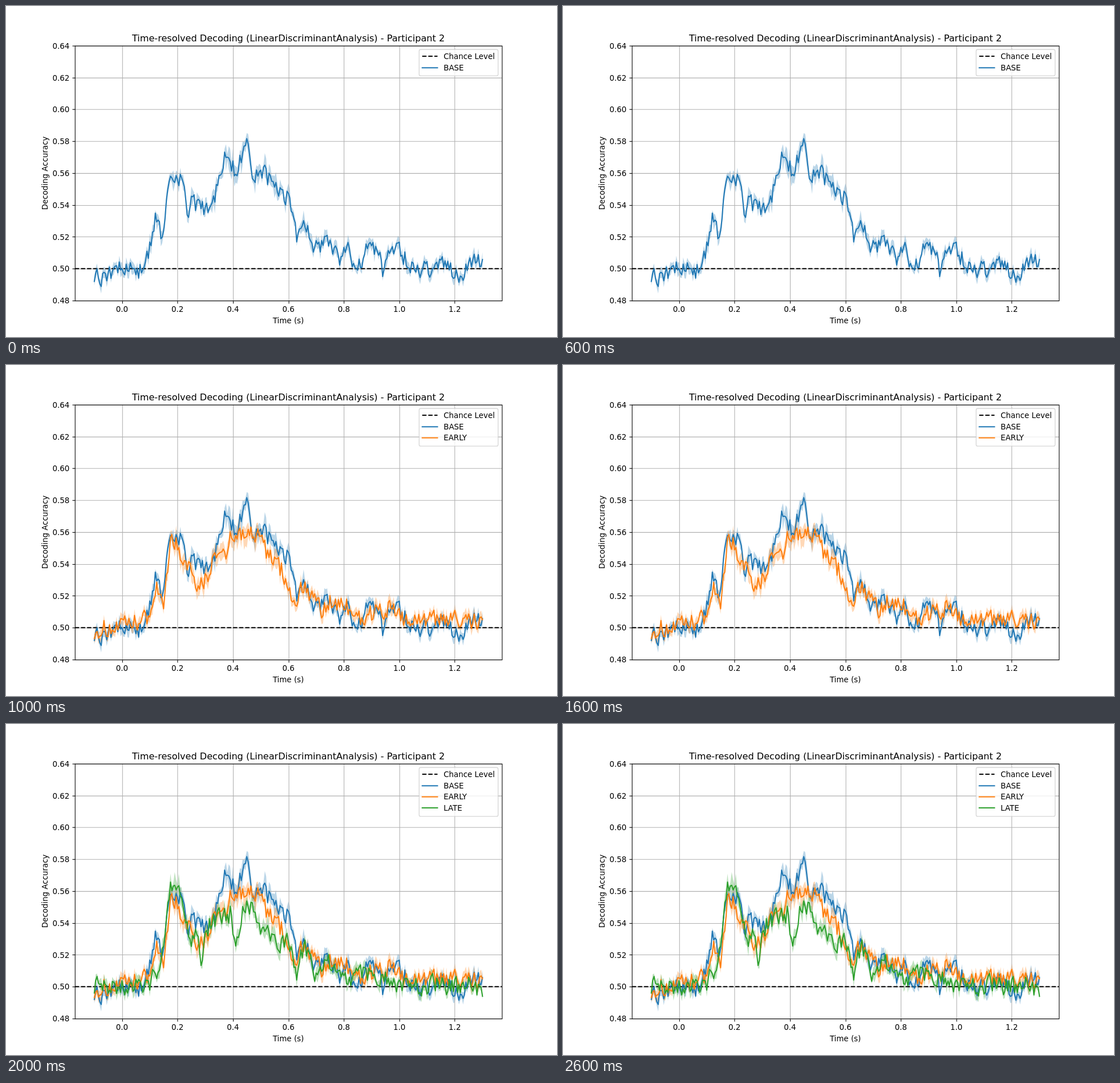
Write an HTML page that moves like this. It is 966 by 580 pixels and loops after 3000 ms.

```html
<!DOCTYPE html>
<html lang="en">
<head>
<meta charset="utf-8">
<title>Time-resolved Decoding</title>
<style>
  html, body { margin: 0; width: 100%; height: 100%; overflow: hidden; background: #fff; }
  svg { display: block; width: 966px; height: 580px; }
  text { font: 13.89px "DejaVu Sans", sans-serif; fill: #000; }
  .title { font-size: 16.67px; }
  .mid { text-anchor: middle; }
  .end { text-anchor: end; }
  .grid { stroke: #b0b0b0; stroke-width: 1.11; }
  .axis { stroke: #000; stroke-width: 1.11; fill: none; }
  .curve { fill: none; stroke-width: 2.08; stroke-linejoin: round; stroke-linecap: square; }
  .band { fill-opacity: .3; }
  .chance { stroke: #000; stroke-width: 2.08; stroke-dasharray: 7.71 3.33; }
  .box { fill: #fff; fill-opacity: .8; stroke: #ccc; stroke-opacity: .8; stroke-width: 1.39;
         animation: grow 3s step-end infinite; }
  .early { animation: early 3s step-end infinite; }
  .late { animation: late 3s step-end infinite; }
  @keyframes early { 0% { visibility: hidden } 33.3333%, 100% { visibility: visible } }
  @keyframes late { 0% { visibility: hidden } 66.6667%, 100% { visibility: visible } }
  @keyframes grow { 0% { height: 47.7px } 33.3333% { height: 68.1px } 66.6667%, 100% { height: 88.5px } }
</style>
</head>
<body>
<svg id="chart" viewBox="0 0 1000 600" preserveAspectRatio="none"></svg>
<script>
const svg = document.getElementById('chart');
const box = { left: 125, right: 900, top: 72, bottom: 534 };

function add(tag, attrs, label) {
  const el = document.createElementNS('http://www.w3.org/2000/svg', tag);
  for (const key in attrs) el.setAttribute(key, attrs[key]);
  if (label) el.textContent = label;
  svg.appendChild(el);
}
const line = (cls, x1, y1, x2, y2, extra) => add('line', { class: cls, x1, y1, x2, y2, ...extra });
const text = (cls, x, y, label, extra) => add('text', { class: cls, x, y, ...extra }, label);
const snap = v => Math.ceil(v - 0.501) + 0.5;

const timeX = t => 160.23 + (t + 0.1) * 503.25;
const accY = a => box.bottom - (a - 0.48) / 0.16 * 462;

function random(seed) {
  return () => (seed = (seed * 16807) % 2147483647) / 2147483647;
}

// Key points of each trend: [seconds, thousandths above chance]
const series = [
  { name: 'BASE', cls: 'base', color: '#1f77b4', seed: 71, keys: [
    [-0.1, -2], [-0.07, -8], [-0.03, 0], [0.08, -1], [0.12, 30], [0.14, 20], [0.18, 57], [0.215, 55],
    [0.238, 31], [0.255, 44], [0.285, 34], [0.345, 50], [0.37, 71], [0.41, 61], [0.45, 76], [0.48, 53],
    [0.495, 62], [0.55, 53], [0.605, 42], [0.63, 20], [0.66, 32], [0.69, 15], [0.75, 16], [0.78, 7],
    [0.82, 11], [0.85, 1], [0.9, 15], [0.94, 0], [0.975, 16], [1.05, 0], [1.17, 1], [1.23, -7], [1.26, 5], [1.3, 1]] },
  { name: 'EARLY', cls: 'early', color: '#ff7f0e', seed: 1234, keys: [
    [-0.1, -1], [0, 0], [0.1, 6], [0.125, 26], [0.15, 18], [0.18, 59], [0.215, 44], [0.25, 39], [0.28, 24],
    [0.36, 53], [0.378, 40], [0.395, 59], [0.44, 61], [0.49, 56], [0.52, 48], [0.58, 35], [0.62, 16],
    [0.66, 28], [0.72, 8], [0.75, 15], [0.82, 13], [0.86, 4], [0.9, 9], [0.97, 12], [1, 5], [1.3, 4]] },
  { name: 'LATE', cls: 'late', color: '#2ca02c', seed: 987, keys: [
    [-0.1, 2], [0.09, 0], [0.14, 13], [0.175, 60], [0.195, 61], [0.215, 53], [0.25, 26], [0.265, 30],
    [0.285, 18], [0.305, 38], [0.39, 46], [0.41, 30], [0.45, 55], [0.49, 37], [0.52, 40], [0.55, 30],
    [0.6, 27], [0.63, 9], [0.66, 26], [0.7, 8], [0.75, 15], [0.79, 7], [0.88, 7], [1, 2], [1.3, 0]] }
];

function trend(keys, t) {
  const i = Math.max(1, keys.findIndex(k => k[0] >= t - 1e-9));
  const [t0, a0] = keys[i - 1], [t1, a1] = keys[i];
  return a0 + (a1 - a0) * (t - t0) / (t1 - t0);
}

// Trend plus seeded noise, with a wider error band where the response is strong
for (const s of series) {
  const rnd = random(s.seed);
  const mean = [], upper = [], lower = [];
  let noise = 0;
  for (let i = 0; i <= 280; i++) {
    const t = i / 200 - 0.1;
    const gain = trend(s.keys, t);
    noise = 0.25 * noise + (rnd() - 0.5) * 12;
    const x = timeX(t), y = accY(0.5 + (gain + noise) / 1000);
    const err = 4 + (10 + Math.max(0, gain) / 6) * rnd();
    mean.push([x, y]);
    upper.push([x, y - err]);
    lower.unshift([x, y + err]);
  }
  const path = pts => pts.map(p => p.map(v => v.toFixed(2)).join()).join(' ');
  s.mean = path(mean);
  s.area = path([...upper, ...lower]);
}

for (const s of series) add('polygon', { class: 'band ' + s.cls, points: s.area, fill: s.color });

for (let i = 0; i <= 6; i++) {
  const t = i / 5, x = Math.floor(timeX(t) + 0.5) + 0.5;
  line('grid', x, box.top, x, box.bottom);
  line('axis', x, box.bottom + 0.5, x, box.bottom + 5.4);
  text('mid', timeX(t), 554.8, t.toFixed(1));
}
for (let i = 0; i <= 8; i++) {
  const a = 0.48 + i / 50, y = i % 8 ? snap(accY(a)) : accY(a) + 0.5;
  line('grid', box.left, y, box.right, y);
  line('axis', box.left + 0.5, y, box.left - 4.4, y);
  text('end', 115.3, accY(a) + 5.3, a.toFixed(2));
}

line('chance', box.left, 476, box.right, 476);
for (const s of series) add('polyline', { class: 'curve ' + s.cls, points: s.mean, stroke: s.color });
add('rect', { class: 'axis', x: 125.5, y: 72.5, width: 775, height: 462 });

text('mid title', 512.5, 63.9, 'Time-resolved Decoding (LinearDiscriminantAnalysis) - Participant 2');
text('mid', 512.5, 574.8, 'Time (s)');
text('mid', 0, 0, 'Decoding Accuracy', { transform: 'translate(75.9 303) rotate(-90)' });

add('rect', { class: 'box', x: 749.8, y: 78.9, width: 143.3, height: 47.7, rx: 2.78 });
const rowY = i => Math.round(91.3 + 20.39 * i);
line('chance', 755.4, rowY(0), 783.1, rowY(0));
text('', 794.2, rowY(0) + 5, 'Chance Level');
series.forEach((s, i) => {
  const y = rowY(i + 1);
  line('curve ' + s.cls, 755.4, y, 783.1, y, { stroke: s.color });
  text(s.cls, 794.2, y + 5, s.name);
});
</script>
</body>
</html>
```
